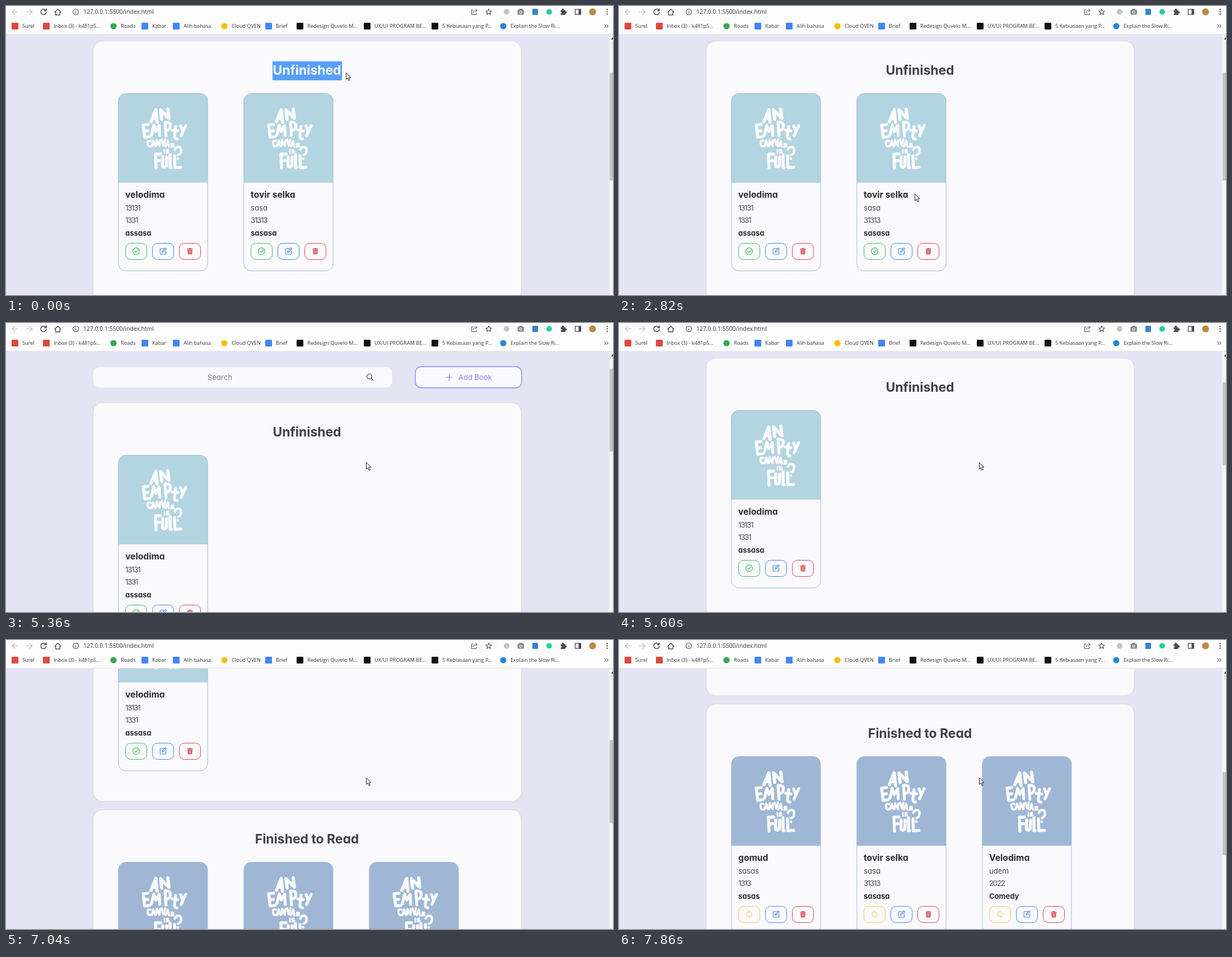
Write an HTML page that moves like this. It is 1084 by 517 pixels and loops after 7990 ms.

```html
<!DOCTYPE html>
<html lang="id">
<head>
<meta charset="utf-8">
<title>Book shelf</title>
<style>
  html, body { margin: 0; width: 100%; height: 100%; overflow: hidden; background: #e5e4f5; }
  svg { display: block; width: 1084px; height: 517px; }
  text { font-family: Inter, "Open Sans", sans-serif; font-feature-settings: "cv11"; fill: #4b4b50; font-size: 13.2px; white-space: pre; }
  .head { font-size: 22.9px; font-weight: 700; fill: #414145; text-anchor: middle; }
  .name { font-size: 15.7px; font-weight: 700; fill: #2d2d31; }
  .bold { font-weight: 700; fill: #2d2d31; font-size: 13px; }
  .num { letter-spacing: -1.2px; }
  .bar text { font-family: "Open Sans", "Noto Sans", sans-serif; font-size: 9.2px; fill: #35363a; }
  .bar text.url { font-size: 10.4px; }
  .line { fill: none; stroke-linecap: round; stroke-linejoin: round; }
</style>
</head>
<body>
<svg id="stage" viewBox="0 0 1084 517"></svg>
<script>
const LOOP = 7990;
const GREEN = '#3fbb58', BLUE = '#3d86ee', RED = '#da4450', YELLOW = '#fbc546';

const text = (x, y, s, cls = '', extra = '') => `<text x="${x}" y="${y}" class="${cls}" ${extra}>${s}</text>`;
const line = (d, color, width = 1.2, extra = '') =>
  `<path class="line" d="${d}" stroke="${color}" stroke-width="${width}" ${extra}/>`;
const rect = (x, y, w, h, fill, extra = '') =>
  `<rect x="${x}" y="${y}" width="${w}" height="${h}" fill="${fill}" ${extra}/>`;
const dot = (x, y, r, fill) => `<circle cx="${x}" cy="${y}" r="${r}" fill="${fill}"/>`;
const at = (x, y, body, extra = '') => `<g transform="translate(${x} ${y})" ${extra}>${body}</g>`;

// Letter strokes on a 2 by 4 grid
const GLYPH = {
  A: 'M0 4L1 0L2 4M.4 2.8H1.7', N: 'M0 4V0L2 4V0', E: 'M2 0H0V4H2M0 2H1.6',
  M: 'M0 4L.4 0L1 2.4L1.7 0L2 4', P: 'M0 4V0Q2.4 0 2 1.3T0 2.2', T: 'M1 0V3Q1 4 2 4M0 1.3H2',
  Y: 'M0 .3L1 2.2M2 0L.6 4', C: 'M2 .6Q0-.8 0 2T2 3.5', V: 'M0 0L1 4L2 0',
  S: 'M2 .3Q0-.3 0 1T2 2.7T0 3.8', I: 'M0 0V4', F: 'M2 0H0V4M0 1.9H1.6',
  U: 'M0 0V3Q0 4 1 4T2 3V0', L: 'M0 0V4H2', '?': 'M0 1Q.2 0 1.1 0T2 1.2T1.1 2.7M1.1 3.95V4'
};
// [stroke, ...[letter, x, y, width, height, turn]]
const WORDS = [
  [5.8, ['A', 262, 185, 11, 22, 8], ['N', 276, 186, 13, 17, -7]],
  [5.2, ['E', 245, 213, 9, 22, -7], ['M', 261, 213, 15, 18, 4], ['P', 284, 208, 9, 25, -4],
    ['T', 298, 215, 10, 22, 7], ['Y', 312, 213, 9, 19, 6]],
  [3.8, ['C', 252, 241, 6, 11, -10], ['A', 260, 241, 6, 10, -2], ['N', 269, 240, 6, 10, 5],
    ['V', 278, 239, 6, 11, -2], ['A', 286, 241, 6, 10, 6], ['S', 296, 246, 3, 6, 8]],
  [3, ['I', 283, 257, 1, 6, 0], ['S', 287, 257, 3, 6, 0]],
  [5.4, ['F', 267, 265, 9, 25, -2], ['U', 280, 270, 7, 18, 2], ['L', 293, 266, 2, 23, 0], ['L', 301, 268, 10, 21, -2]],
  [4.4, ['?', 302, 252, 11, 21, 3]]
];
const art = WORDS.map(([width, ...letters]) => letters.map(([c, x, y, w, h, r]) =>
  line(GLYPH[c], '#fafbfd', width,
    `vector-effect="non-scaling-stroke" transform="translate(${x} ${y}) rotate(${r}) scale(${w / 2} ${h / 4})"`)
).join('')).join('');

const ICON = {
  check: c => line('M-6 0a6 6 0 1 0 12 0a6 6 0 1 0-12 0M-2.8 0L-.7 2.2L3-2.2', c),
  again: c => line('M-1.8-4.3A4.7 4.7 0 0 1 4.6 1M1.8 4.3A4.7 4.7 0 0 1-4.6-1M3 4A4.7 4.7 0 0 0 4.4 1.8M-3-4A4.7 4.7 0 0 0-4.4-1.8M-.6-5.8L-2-4.3L-.5-3M.6 5.8L2 4.3L.5 3', c, 1),
  edit: c => line('M2-5H-4Q-5.3-5-5.3-3.7V4Q-5.3 5.3-4 5.3H3.8Q5 5.3 5 4V-.5M-1.8 1.8L-1.2-.6L4.2-6L5.9-4.3L.6 1.2Z', c, 1.1),
  trash: c => `<path fill="${c}" d="M-5-4.8H-1.8L-1.2-5.8H1.2L1.8-4.8H5V-3.2H-5ZM-4.3-2.5H4.3L3.6 5.6H-3.6Z"/>` +
    line('M-1.7-1V4M0-1V4M1.7-1V4', '#fafbfd', .6)
};
const button = (i, color, icon, id = '') => at(12.7 + 48 * i, 268,
  `<rect ${id && `id="${id}"`} width="38" height="29" rx="9" fill="none" stroke="${color}"/>` + at(19, 14.2, ICON[icon](color)));

const LEFT = 200.8, CARD = 159.2;
function card(col, top, [name, author, year, genre], done, id = '') {
  const tint = done ? '#9fb7d5' : '#b3d4e1';
  const small = (y, s) => text(12.2, y, s, /^\d/.test(s) ? 'num' : '');
  return at(LEFT + 224 * col, top + .5,
    `<path fill="${tint}" d="M0 159.5V14a14 14 0 0 1 14-14H${CARD - 14}a14 14 0 0 1 14 14V159.5Z"/>` +
    `<use href="#art" x="${-LEFT}" y="-156.5"/>` +
    `<rect width="${CARD}" height="317.5" rx="13" fill="none" stroke="#a3bad5"/>` +
    text(12.2, 186, name, 'name') + small(209, author) + small(231.5, year) + text(12.2, 254, genre, 'bold') +
    (done ? button(0, YELLOW, 'again') : button(0, GREEN, 'check', id && 'ok')) +
    button(1, BLUE, 'edit') + button(2, RED, 'trash'), id && `id="${id}"`);
}
const panel = top => rect(155.5, top, 765, 466, '#fafafd', 'rx="17" stroke="#dddde2" stroke-width="1.6"');

const first = ['velodima', '13131', '1331', 'assasa'];
const second = ['tovir selka', 'sasa', '31313', 'sasasa'];

const page =
  rect(155, -2, 535.5, 38, '#fafafd', 'rx="12" stroke="#dfdfe8"') +
  text(382, 21.5, 'Search', '', 'text-anchor="middle" style="fill:#808085"') +
  line('M644.5 15.5a4.5 4.5 0 1 0 9 0a4.5 4.5 0 1 0-9 0M652.3 18.8L656 22.5', '#333', 1.2) +
  rect(731, -2, 190, 38, '#fafafd', 'rx="11" stroke="#a19df3" stroke-width="1.8"') +
  line('M786 17H797M791.5 11.5V22.5', '#8783ee', 1.2) +
  text(808, 22, 'Add Book', '', 'style="fill:#8581ee;font-size:13px"') +
  panel(62.5) +
  rect(476, 99, 124, 34, '#58a0fb', 'id="mark"') +
  text(537.5, 123.3, 'Unfinished', 'head', 'id="title"') +
  card(0, 156, first) + card(1, 156, second, false, 'gone') +
  `<g id="pick">${rect(446, 326, 0, 23, '#58a0fb', 'id="pickBox"')}` +
  `<g clip-path="url(#pickClip)">${text(437, 342.5, second[0], 'name', 'style="fill:#fff"')}</g></g>` +
  panel(543.5) + text(537.5, 604.3, 'Finished to Read', 'head') +
  card(0, 637, ['gomud', 'sasas', '1313', 'sasas'], true) +
  card(1, 637, second, true) +
  card(2, 637, ['Velodima', 'udem', '2022', 'Comedy'], true);

// [centre, colour, round, label]
const MARKS = [
  [16, '#e0483e', 0, 'Surel'], [72, '#e0483e', 0, 'Inbox (3) - k481p5...'],
  [192, '#34a853', 1, 'Roads'], [248, '#4285f4', 0, 'Kabar'], [304, '#4285f4', 0, 'Alih bahasa'],
  [390, '#fbbc04', 1, 'Cloud QVEN'], [469, '#4285f4', 0, 'Brief'],
  [525, '#111', 0, 'Redesign Quvelo M...'], [645, '#111', 0, 'UX/UI PROGRAM BE...'],
  [766, '#111', 0, '5 Kebiasaan yang P...'], [888, '#2387dc', 1, 'Explain the Slow Ri...']
];
const DARK = '#4a4b50', PALE = '#b9babd';
const bar = rect(0, 0, 1084, 51, '#fdfdfe') + rect(0, 50, 1084, 1, '#e3e3ec') +
  line('M21 10.5H11M15.5 6L11 10.5L15.5 15', PALE) + line('M36.5 10.5H46.5M42 6L46.5 10.5L42 15', PALE) +
  line('M71.5 8A5 5 0 1 0 72 11.5M72 5V8.5H68.5', DARK, 1.5) +
  line('M87 11L92.5 5.5L98 11M88.7 10V16H96.3V10', DARK, 1.4) +
  line('M119.7 10.5a5 5 0 1 0 10 0a5 5 0 1 0-10 0M124.7 10V13M124.7 7.9V8', DARK, 1.1) +
  text(138, 14.4, '127.0.0.1:5500/index.html', 'url') +
  line('M834 7H831.5V15.5H840V13M834 12Q834.5 8 841 8M838.5 5.5L841.5 8L838.5 10.5', DARK, 1) +
  line('M862 5.3L863.5 8.8L867.2 9.1L864.4 11.5L865.3 15.2L862 13.2L858.7 15.2L859.6 11.5L856.8 9.1L860.5 8.8Z', DARK, 1.1) +
  dot(894, 10.5, 5, '#c3c4c8') +
  rect(913.5, 6.5, 11.5, 9, '#85878c', 'rx="1.5"') + rect(916.5, 5, 5.5, 3, '#85878c') + dot(919.2, 11, 2.6, '#eee') + dot(919.2, 11, 1.4, '#85878c') +
  rect(940, 5, 10, 11, '#3a81cf', 'rx="1"') + dot(970, 10.5, 5, '#25d09b') +
  rect(990.5, 7.5, 8.5, 8.5, DARK, 'rx="1"') + dot(994.5, 6.8, 2, DARK) + dot(999.6, 11.5, 2, DARK) + dot(991, 12, 1.5, '#fdfdfe') +
  rect(1016.5, 6, 10, 9, 'none', `stroke="${DARK}" stroke-width="1.3"`) + rect(1022.5, 6, 4, 9, DARK) +
  dot(1047.5, 10.5, 6.2, '#bd8a43') + [6.2, 10.5, 14.8].map(y => dot(1073.5, y, 1.2, DARK)).join('') +
  MARKS.map(([x, c, round, s]) =>
    (round ? dot(x, 36, 5.6, c) : rect(x - 6, 30, 12, 12, c, 'rx="1"')) + text(x + 13, 39.2, s)).join('') +
  line('M1069 33.5L1071.3 36L1069 38.5M1072.7 33.5L1075 36L1072.7 38.5', DARK, 1.1);

const CURSOR = {
  arrow: 'M0 0V11.8L2.7 9.3L4.7 14L6.6 13.1L4.7 8.5H8.3Z',
  beam: 'M-3 0H-1Q0 0 0 1V15Q0 16-1 16H-3M3 0H1Q0 0 0 1M0 15Q0 16 1 16H3',
  hand: 'M-1.5 9V1.3A1.4 1.4 0 0 1 1.4 1.3V5.5L6.5 6.8Q8 7.3 8 8.8V12L6.8 16H-.5L-4.6 10.2Q-4.8 8-1.5 10Z'
};
const stage = document.getElementById('stage');
stage.innerHTML =
  `<defs><g id="art">${art}</g><clipPath id="pickClip">${rect(446, 326, 0, 23, '#000', 'id="pickHole"')}</clipPath></defs>` +
  rect(0, 0, 1084, 517, '#e5e4f5') + `<g id="page">${page}</g>` +
  rect(1077, 51, 7, 466, '#f3f3f6') + rect(1078, 119, 6, 193, '#c2c2c5', 'id="thumb"') +
  '<path d="M1080 60L1084 56V60Z" fill="#505054"/>' +
  `<g class="bar">${bar}</g><path id="cursor" stroke="#222" stroke-width="1" stroke-linejoin="round"/>`;

// Each row holds until the next one: [ms, x, y, shape]
const MOVES = [
  [0, 607, 119], [150, 609, 118], [270, 610, 119], [800, 575, 196], [920, 539, 277],
  [1070, 512, 322], [1190, 488, 354], [1340, 470, 341, 'beam'], [1460, 457, 337, 'beam'],
  [1580, 450, 334, 'beam'], [1700, 447, 333, 'beam'], [1820, 446, 332, 'beam'],
  [2120, 465, 332, 'beam'], [2240, 499, 333, 'beam'], [2360, 520, 334], [2510, 528, 336],
  [3110, 507, 364], [3230, 473, 405], [3350, 452, 430, 'hand'], [3470, 446, 438, 'hand'],
  [3610, 448, 442, 'hand'], [4140, 447, 441], [4420, 474, 416], [4540, 554, 340],
  [4660, 623, 272], [4790, 643, 249], [6800, 643, 246]
];
const SCROLL = [
  [0, 0], [5210, -65], [5360, -80], [5480, -24], [5600, 0], [5750, 58], [5870, 80],
  [6160, 120], [6280, 160], [6680, 180], [6800, 220], [6920, 236], [7040, 240],
  [7190, 300], [7310, 372], [7460, 400], [7860, 429]
];
const held = (rows, t) => rows.findLast(r => r[0] <= t);
const node = id => document.getElementById(id);
const set = (id, props) => { for (const k in props) node(id).setAttribute(k, props[k]); };
const show = (id, on) => set(id, { visibility: on ? 'visible' : 'hidden' });

function draw(t) {
  const [, x, y, shape = 'arrow'] = held(MOVES, t);
  const scroll = held(SCROLL, t)[1];
  const marked = t < 520, removed = t >= 4140;
  const picking = t >= 2120 && t < 2820;
  const pickWidth = picking ? Math.min(x, 520) - 446 : 0;
  const hover = t >= 3350 && !removed;

  set('page', { transform: `translate(0 ${-scroll})` });
  set('thumb', removed ? { y: 106 + scroll * .304, height: 148.5 } : { y: 119, height: 193 });
  show('mark', marked);
  node('title').style.fill = marked ? '#fff' : '';
  show('pick', picking);
  set('pickBox', { width: pickWidth });
  set('pickHole', { width: pickWidth });
  show('gone', !removed);
  set('ok', { fill: hover ? GREEN : 'none' });
  node('ok').nextElementSibling.firstElementChild.setAttribute('stroke', hover ? '#fff' : GREEN);
  set('cursor', { d: CURSOR[shape], transform: `translate(${x + .5} ${y + .5})`, fill: shape === 'beam' ? 'none' : '#fff' });
}

const start = performance.now();
function tick() {
  draw((performance.now() - start) % LOOP);
  requestAnimationFrame(tick);
}
tick();
</script>
</body>
</html>
```
